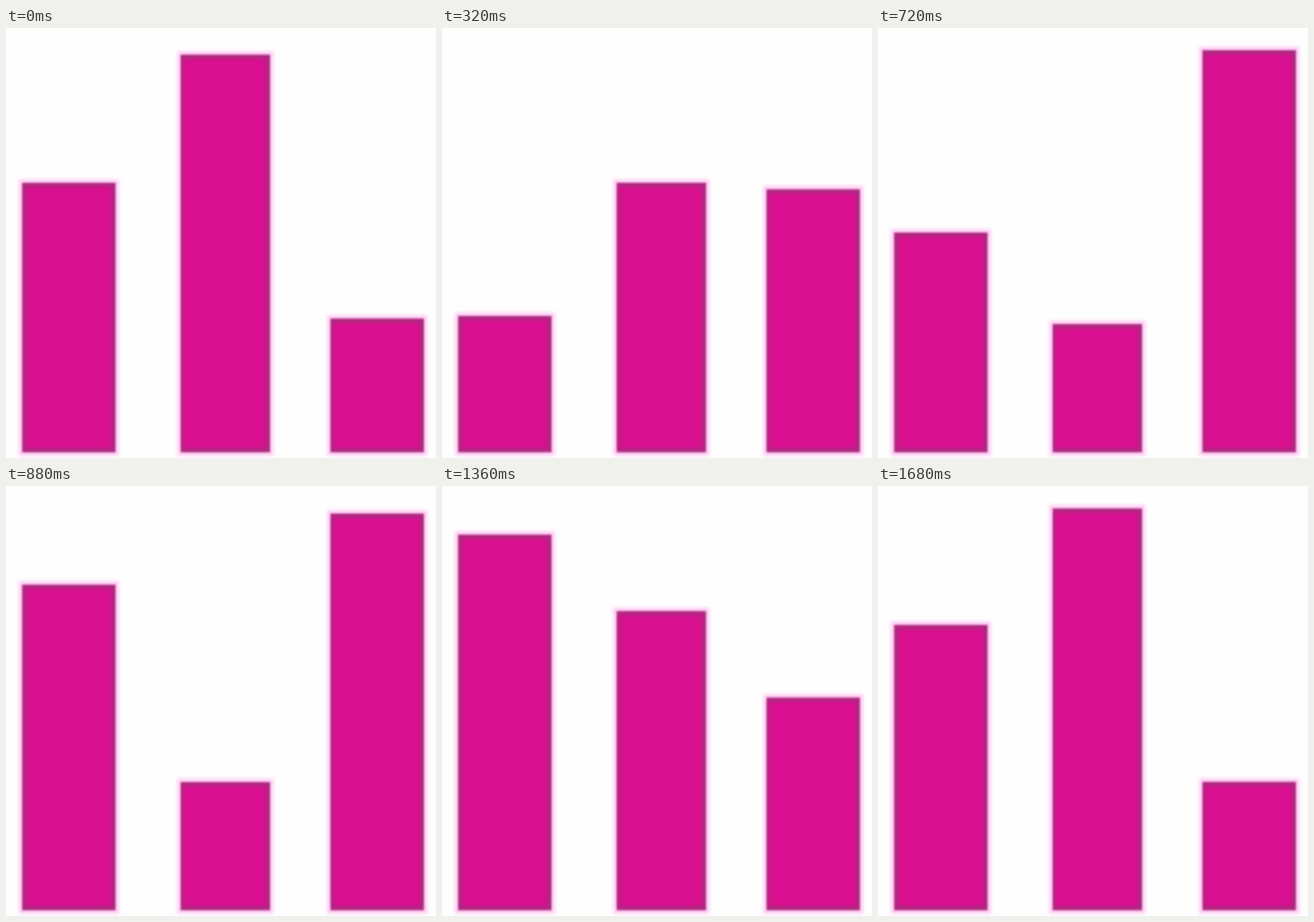
Animation, 640 px wide and 639 px high, one loop 1760 ms. Source, as an HTML page:

```html
<!DOCTYPE html>
<html lang="en">
<head>
<meta charset="utf-8">
<title>Bars</title>
<style>
  html, body { margin: 0; width: 100%; height: 100%; overflow: hidden; background: #fefefe; }
  svg { display: block; width: 100%; height: 100%; }
</style>
</head>
<body>
<svg viewBox="0 0 640 639" preserveAspectRatio="none">
  <defs>
    <filter id="crisp" filterUnits="userSpaceOnUse" x="0" y="0" width="640" height="639" color-interpolation-filters="sRGB">
      <feGaussianBlur stdDeviation="1.8"/>
    </filter>
    <filter id="soft" filterUnits="userSpaceOnUse" x="0" y="0" width="640" height="639" color-interpolation-filters="sRGB">
      <feGaussianBlur stdDeviation="2.5"/>
    </filter>
  </defs>
  <g id="halo" fill="#ffccf4" filter="url(#soft)"></g>
  <g id="edge" fill="#ac2a7e" filter="url(#crisp)"></g>
  <g id="core" fill="#d80f8f" filter="url(#soft)"></g>
</svg>
<script>
const STEP = 80, COUNT = 22;
const HIGH = 33, LOW = 440, BASE = 630.5;

// level: 1 raised, 0 lowered; moves: [start, end] in steps, alternating direction
const bars = [
  { x: 24, w: 139, rim: 6, level: 1, moves: [[-4.9, 5.1], [5.9, 13.8], [13.8, 29.7]] },
  { x: 260, w: 133, rim: 4, level: 1, moves: [[-0.8, 9], [11.2, 21.2]] },
  { x: 483, w: 139, rim: 4, level: 0, moves: [[-0.9, 9], [10, 21.2]] }
];

function addRect(id) {
  const r = document.createElementNS("http://www.w3.org/2000/svg", "rect");
  document.getElementById(id).appendChild(r);
  return r;
}

function place(r, x0, y0, x1, y1) {
  r.setAttribute("x", x0);
  r.setAttribute("y", y0);
  r.setAttribute("width", x1 - x0);
  r.setAttribute("height", y1 - y0);
}

// Cosine ease from 0 to 1 between two steps
function ease(s, from, to) {
  const u = Math.min(1, Math.max(0, (s - from) / (to - from)));
  return (1 - Math.cos(Math.PI * u)) / 2;
}

function topAt({ level, moves }, s) {
  let h = level, dir = level ? -1 : 1;
  for (const [from, to] of moves) {
    h += dir * ease(s, from, to);
    dir = -dir;
  }
  return LOW + (HIGH - LOW) * h;
}

for (const b of bars) {
  for (const id of ["halo", "edge", "core"]) b[id] = addRect(id);
}

function draw(ms) {
  const s = Math.floor(ms / STEP) % COUNT;
  for (const b of bars) {
    const { x, w, rim } = b, y = topAt(b, s), r = x + w;
    place(b.halo, x - 5, y - 5, r + 5, BASE + 5);
    place(b.edge, x, y, r, BASE);
    place(b.core, x + rim, y + 6, r - 6, BASE - 6);
  }
}

const start = performance.now();
function tick() {
  draw(performance.now() - start);
  requestAnimationFrame(tick);
}
draw(0);
requestAnimationFrame(tick);
</script>
</body>
</html>
```
